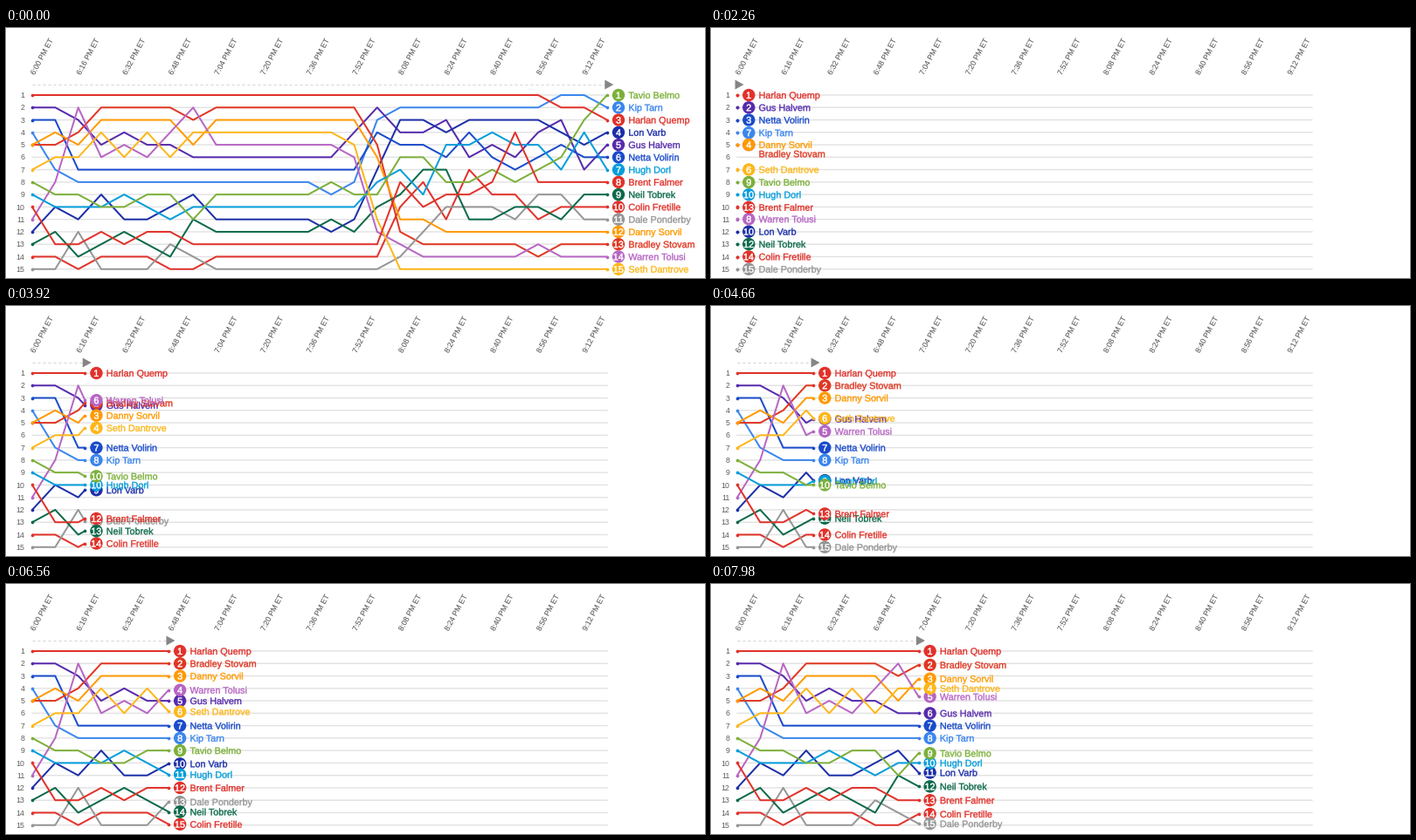
These frames come from a looping animation (800 px wide and 287 px high, 8000 ms). A matplotlib script:

```python
import math

import matplotlib.pyplot as plt
import numpy as np
from matplotlib.animation import FuncAnimation
from matplotlib.patches import Circle, PathPatch, Polygon, Rectangle
from matplotlib.path import Path
from matplotlib.textpath import TextPath
from matplotlib.transforms import Affine2D

W, H, DPI = 800, 287, 64
PT = 72 / DPI                 # points per pixel
STEP_MS, LOOP_MS = 20, 8000

X0, DX, LAST = 30, 26.32, 25  # time axis
Y0, DY = 77, 14.27            # rank axis
RAIL_Y = 65

FADE_OUT_END = 580
FADE_IN = (1320, 2120)
RUN_START, MS_PER_STEP = 2253, 726

CALM_END, SHAKEUP, SPAN = 8, 13.5, 3   # in time steps

FONT = "Liberation Sans"
RED, GREY = "#e1322b", "#5c5c5c"

fig = plt.figure(figsize=(W / DPI, H / DPI), dpi=DPI, facecolor="white")
ax = fig.add_axes([0, 0, 1, 1])
ax.set_xlim(0, W)
ax.set_ylim(H, 0)
ax.axis("off")

rng = np.random.default_rng(15)
steps = np.arange(LAST + 1)


def rank_y(rank):
    return Y0 + DY * (rank - 1)


def ramp(t, start, end):
    return np.clip((t - start) / (end - start), 0, 1)


def glyphs(text, size, centered=False):
    path = TextPath((0, 0), text, size=size, prop={"family": FONT})
    if not centered:
        return path
    box = path.get_extents()
    return Path(path.vertices - [(box.x0 + box.x1) / 2, 0], path.codes)


def ink(path, color, weight, z):
    return ax.add_patch(PathPatch(path, fc=color, ec=color, lw=weight * PT, zorder=z))


def place(patch, x, y, angle=0):
    patch.set_transform(Affine2D().scale(1, -1).rotate_deg(angle).translate(x, y)
                        + ax.transData)


DIGITS = {n: glyphs(str(n), 10.8, centered=True) for n in range(1, 16)}


def standing(finish, knots):
    """Follow the knots, then swing over to the finish with a seeded wobble."""
    at, value = zip(*knots)
    turn = max(SHAKEUP, at[-1])
    u = ramp(steps, turn, turn + SPAN)
    ease = u * u * (3 - 2 * u)
    trend = np.interp(steps, at, value) * (1 - ease) + finish * ease
    amp = 1.5 * np.sin(np.pi * trend / 16) ** 2
    amp *= 0.25 + 0.75 * ramp(steps, SHAKEUP, SHAKEUP + SPAN)
    amp[(steps <= CALM_END) | (steps == LAST)] = 0
    return trend + amp * rng.standard_normal(LAST + 1)


class Racer:
    def __init__(self, z, name, color, finish, *knots):
        self.standing = standing(finish, knots)
        self.drop = 0
        self.line, = ax.plot([], [], color=color, lw=2 * PT, zorder=z, snap=False,
                             solid_joinstyle="round", solid_capstyle="butt")
        self.dots, = ax.plot([], [], "o", color=color, ms=3.7 * PT, mew=0, zorder=z)
        z += 30
        self.disc = ax.add_patch(Circle((0, 0), 7.2, fc=color, lw=0, zorder=z))
        self.digit = ink(DIGITS[1], "white", 0.45, z + 0.2)
        self.label = ink(glyphs(name, 10.8), color, 0.35, z + 0.4)

    def update(self, s):
        x, y = X0 + DX * s, rank_y(np.interp(s, steps, self.ranks))
        done = steps[:math.floor(s) + 1]
        self.line.set_data(np.append(X0 + DX * done, x),
                           np.append(rank_y(self.ranks[done]), y))
        self.dots.set_data([X0, x], [rank_y(self.ranks[0]), y])
        self.disc.center = (x + 13, y)
        self.digit.set_path(DIGITS[int(self.ranks[math.ceil(s)])])
        place(self.digit, x + 13, y + 3.9)
        place(self.label, x + 24.3, y + 3.9 + self.drop * max(0, 1 - s))


# Name, colour, final rank, then (step, standing) turning points.
# Later entries lie on top of earlier ones.
entries = [
    ("Kip Tarn", "#3b86ee", 2, (0, 4), (1, 7), (2, 8)),
    ("Gus Halvem", "#562bac", 5, (1, 2), (3, 4.9)),
    ("Colin Fretille", RED, 10, (0, 14)),
    ("Lon Varb", "#1c2fa8", 4, (0, 12), (1, 10), (2, 11), (3, 9), (4, 11), (5, 11),
     (7, 8.9), (8, 11)),
    ("Netta Volirin", "#1a4bcb", 6, (1, 3), (2, 7)),
    ("Bradley Stovam", "#e03722", 13, (1, 5), (3, 2)),
    ("Dale Ponderby", "#969696", 11, (1, 15), (2, 12.5), (3, 15), (5, 15), (6, 13.1),
     (8, 14.8), (15, 15)),
    ("Danny Sorvil", "#ff9a00", 12, (0, 5), (1, 4.2), (3, 3), (6, 3), (7, 4.5), (8, 3)),
    ("Neil Tobrek", "#0c6a49", 9, (0, 13), (1, 12.5), (2, 13.8), (4, 12.6), (6, 13.8),
     (7, 11), (8, 12)),
    ("Warren Tolusi", "#b766c4", 14, (0, 11), (1, 8), (2, 1.5), (3, 5.5), (5, 5.5),
     (7, 1.5), (8, 4.5)),
    ("Hugh Dorl", "#049ddb", 7, (0, 10)),
    ("Tavio Belmo", "#7cb03a", 1, (0, 9), (2, 9.5), (4, 10.5), (5, 9), (6, 9), (7, 11),
     (8, 9), (22, 7)),
    ("Seth Dantrove", "#fdb71a", 15, (0, 7), (3, 4), (4, 6), (5, 4), (6, 6), (7, 4)),
    ("Harlan Quemp", RED, 3, (21, 1)),
    ("Brent Falmer", RED, 8, (0, 10.5), (1, 13)),
]
racers = [Racer(10 + i, *entry) for i, entry in enumerate(entries)]

# Equal standings share a rank.
table = np.array([r.standing for r in racers])
for i, r in enumerate(racers):
    r.ranks = 1 + (table < r.standing).sum(axis=0)
    if r.standing[0] in table[i + 1:, 0]:
        r.drop = 10.4   # keep the names of a tied start apart

# Fixed axes
for rank in range(1, 16):
    y = rank_y(rank)
    ax.plot([X0, X0 + DX * LAST], [y, y], color="#e2e2e2", lw=1.4 * PT, zorder=1,
            snap=False)
    ax.text(21.5, y + 3.1, str(rank), size=8.8 * PT, color=GREY, family=FONT,
            ha="right", va="baseline")

for i in range(13):
    hour, minute = divmod(16 * i, 60)
    tick = ink(glyphs(f"{6 + hour}:{minute:02d} PM ET", 8.7), GREY, 0.1, 1)
    place(tick, X0 + 2.6 + 2 * DX * i, 54.5, angle=-62)

rail, = ax.plot([], [], color="#d2d2d2", lw=PT, linestyle=(0, (3, 3)), zorder=2)
head = ax.add_patch(Polygon([(0, 0), (0, 1), (1, 0)], fc="#858585", lw=0, zorder=3))
veil = ax.add_patch(Rectangle((0, 0), W, H, fc="white", lw=0, zorder=100))


def draw(frame):
    t = frame * STEP_MS
    if t <= FADE_OUT_END:
        s, cover = LAST, t / FADE_OUT_END
    else:
        s, cover = max(0, (t - RUN_START) / MS_PER_STEP), 1 - ramp(t, *FADE_IN)

    for r in racers:
        r.update(s)

    x = X0 + DX * s
    left = x - 2.7
    rail.set_data([X0, x], [RAIL_Y, RAIL_Y])
    head.set_xy([(left, RAIL_Y - 5.5), (left, RAIL_Y + 5.5), (left + 10, RAIL_Y)])
    veil.set_alpha(cover)
    return []


anim = FuncAnimation(fig, draw, frames=LOOP_MS // STEP_MS, interval=STEP_MS,
                     repeat=True, repeat_delay=0, blit=False)
plt.show()
```
